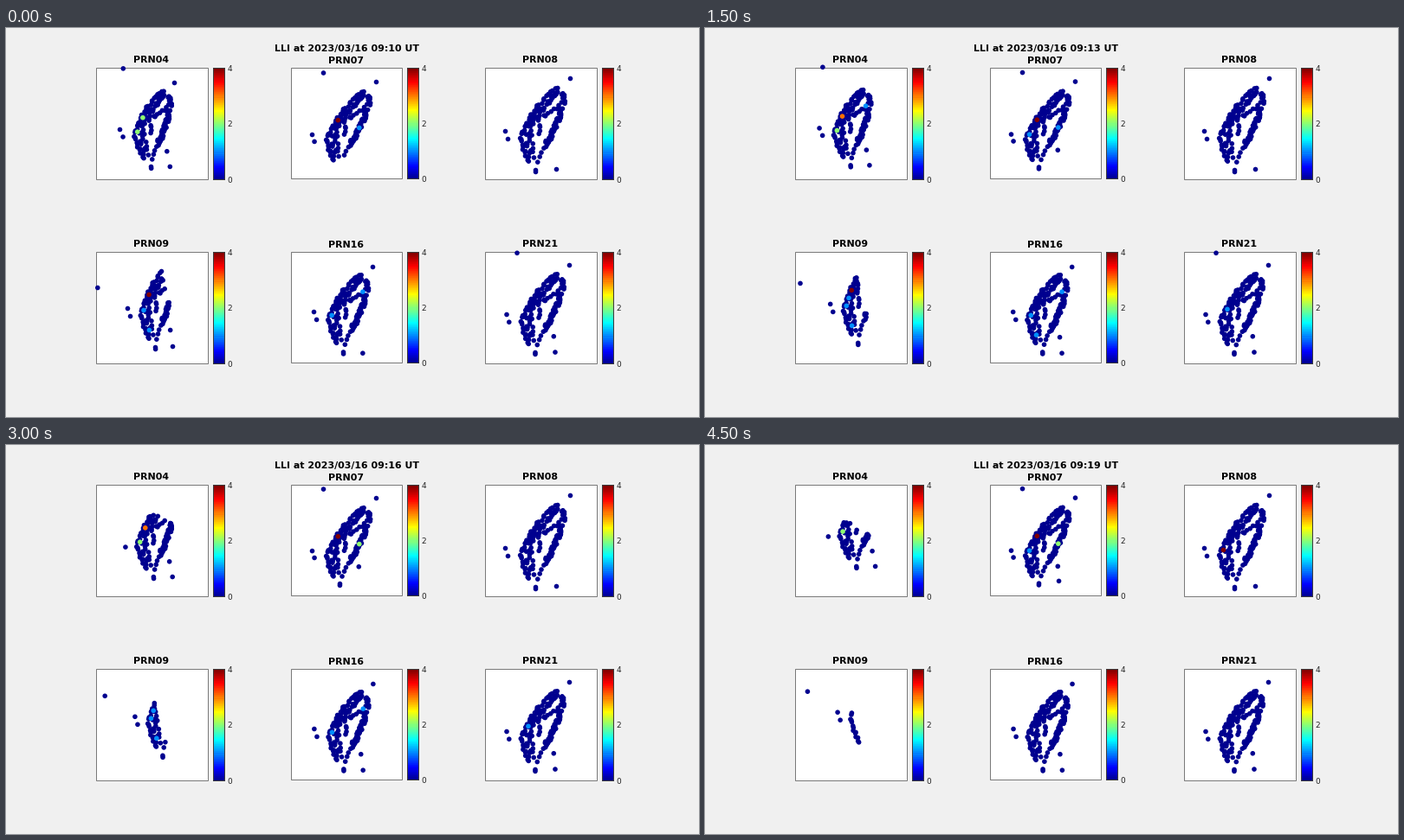
Animation of 800 by 450 pixels, one loop 5000 ms. Source, as a matplotlib script:

```python
import numpy as np
import matplotlib.pyplot as plt
from matplotlib.animation import FuncAnimation
from matplotlib.patches import Rectangle

W, H, DPI = 800, 450, 100
FRAMES, STEP = 10, 500
PX = 72 / DPI
INK = "#262626"
rng = np.random.default_rng(4)


def jet(i):
    """Colour i of a 64-step rainbow."""
    return np.clip(1.5 - np.abs(4 * (np.asarray(i)[..., None] + 1) / 64 - [3, 2, 1]), 0, 1)


def trail(n, jitter, *points):
    """n stations spread along a polyline and scattered around it."""
    p = np.array(points, float)
    d = np.r_[0, np.cumsum(np.hypot(*np.diff(p, axis=0).T))]
    s = np.linspace(0, d[-1], n)
    xy = np.c_[np.interp(s, d, p[:, 0]), np.interp(s, d, p[:, 1])]
    return xy + rng.uniform(-jitter, jitter, xy.shape)


# Station map, in pixels inside a 129 px box
ISLES = {"west": (23, 73), "west2": (26, 82), "north": (98, 12),
         "east": (80, 98), "south": (82, 117), "tip": (58, 118), "tip2": (58, 120)}
HOT = {"A": (53.5, 57), "B": (45, 75), "C": (79.5, 69), "D": (51, 98), "E": (49, 66), "F": (84.5, 43)}
LAND = np.vstack([
    trail(34, 1.5, (82, 23), (70, 31), (61, 44), (50, 58), (40, 82), (44, 97), (51, 108)),
    trail(26, 3.5, (62, 44), (58, 56), (52, 70), (49, 84), (50, 100)),
    trail(9, 1.5, (62, 48), (61, 62), (63, 75)),
    trail(4, 1.5, (56, 86), (55, 102)),
    trail(24, 2.5, (66, 47), (73, 38), (81, 27), (89, 33), (91, 42)),
    trail(8, 2, (66, 56), (75, 49), (88, 45)),
    trail(40, 2.2, (88, 48), (84, 58), (78, 74), (69, 89)),
    trail(4, .7, (67, 92), (63, 100), (60, 108)),
    list(ISLES.values()), list(HOT.values())])
NAMES = [""] * (len(LAND) - len(ISLES) - len(HOT)) + list(ISLES) + list(HOT)


class Panel:
    """One map.

    anchors: where the west, north and tip isles land at the start
    move:    shift of the map at minute t
    cut:     a, b, c, d; a station shows while a*u + b*v > c + d*t
    hide:    isle -> (first, last) minute out of sight
    hot:     station -> mean value, within the minutes of span
    far:     lone station x, y and its last minute
    """

    def __init__(self, name, box, anchors, hot, span=(0, 9), move=lambda t: (0, 0),
                 cut=(0, 0, -1, 0), hide={}, far=None):
        base = [ISLES[k] + (1,) for k in ("west", "north", "tip")]
        self.uv = np.c_[LAND, np.ones(len(LAND))] @ np.linalg.solve(base, np.array(anchors, float))
        self.name, self.box, self.move, self.cut = name, box, move, cut
        self.hide, self.far = hide, far
        self.values = np.zeros((FRAMES, len(LAND)))
        first, last = span
        for key, mean in hot.items():
            noise = rng.uniform(-.45, .45, last - first + 1)
            self.values[first:last + 1, NAMES.index(key)] = np.clip(np.round(mean + noise), 0, 4)

    def dots(self, t):
        a, b, c, d = self.cut
        show = self.uv @ [a, b] > c + d * t
        for key, (first, last) in self.hide.items():
            show[NAMES.index(key)] &= not first <= t <= last
        xy, v = self.uv[show], self.values[t, show]
        if self.far and t <= self.far[2]:
            xy, v = np.vstack([xy, self.far[:2]]), np.r_[v, 0]
        return xy + self.box[:2] + np.array(self.move(t)), v


def ease(t):
    return (t / 9) ** 2.3


panels = [
    Panel("PRN04", (104, 46, 129), [(27, 71), (90, 17), (63, 114)],
          {"A": 2.6, "B": 1.9, "F": .6}, move=lambda t: (7.3 * ease(t), -20 * ease(t)),
          cut=(-.65, 1, -60.3, 9.7), hide={"west": (6, 9)}, far=(30.8, .4, 3)),
    Panel("PRN07", (329, 46, 128), [(24, 76), (98, 15), (56, 114)],
          {"A": 3.5, "B": .7, "C": 1.3}, move=lambda t: (0, 1 - .15 * t),
          cut=(-1, -1, -163, -80), hide={"south": (0, 7)}, far=(37, 4.5, 9)),
    Panel("PRN08", (553, 46, 129), [(23, 73), (98, 12), (58, 118)],
          {"B": 4.5}, span=(7, 9), hide={"east": (0, 9)}),
    Panel("PRN09", (104, 259, 129), [(36, 65), (95, 4), (68, 110)],
          {"A": 3.6, "B": 1.4, "D": 1, "E": .7}, move=lambda t: (1.4 * t, -1.7 * t),
          cut=(-1, .25, -69.5, 3.65), hide={"east": (1, 9), "south": (1, 9)}, far=(1.3, 41, 9)),
    Panel("PRN16", (329, 259, 128), [(26, 69), (94, 17), (60, 115.5)],
          {"B": 1.2, "F": .7, "D": .5}, span=(0, 7),
          move=lambda t: (.06 * t, 0), hide={"east": (0, 0)}),
    Panel("PRN21", (553, 259, 129), [(24.5, 72), (97, 15), (57.5, 116)],
          {"E": 1}, span=(2, 7), far=(36.5, .8, 5)),
]

fig = plt.figure(figsize=(W / DPI, H / DPI), dpi=DPI, facecolor="#f0f0f0")
ax = fig.add_axes([0, 0, 1, 1])
ax.axis("off")


def label(x, y, text, size=11, **kw):
    return ax.text(x, y, text, fontsize=size * PX, family="DejaVu Sans", va="baseline", **kw)


def outline(x, y, w, h, face, edge, z):
    ax.add_patch(Rectangle((x + .5, y + .5), w, h, fc=face, ec=edge, lw=PX, zorder=z, snap=False))


for p in panels:
    x, y, side = p.box
    small = side == 128
    outline(x, y, side, side, "white", "#7a7a7a", 1)
    bx = x + 134 + (not small)
    bar = jet(np.arange(63, -1, -1))[:, None, :]
    ax.imshow(bar, extent=(bx, bx + 14, y + side + 1, y), aspect="auto",
              interpolation="nearest", zorder=2)
    outline(bx, y, 13, side, "none", "#3c3c3c", 3)
    for v in (0, 2, 4):
        label(bx + 16.6, y + side * (1 - v / 4) + 3.6, str(v), 9, color=INK)
    label(x + side / 2 - .6, y - 6 + small, p.name, weight="bold", ha="center")

clock = label(393.4, 27, "", weight="bold", ha="center")
dots = ax.scatter([], [], s=(5.6 * PX) ** 2, linewidths=0, zorder=5)
ax.set_xlim(0, W)
ax.set_ylim(H, 0)


def draw(t):
    parts = [p.dots(t) for p in panels]
    values = np.concatenate([v for _, v in parts])
    order = np.argsort(values, kind="stable")
    dots.set_offsets(np.vstack([xy for xy, _ in parts])[order] + .5)
    dots.set_facecolor(jet(np.minimum(values[order] * 16, 63)))
    clock.set_text(f"LLI at 2023/03/16 09:{10 + t} UT")
    return dots, clock


anim = FuncAnimation(fig, draw, frames=FRAMES, interval=STEP, init_func=lambda: draw(0),
                     repeat=True, repeat_delay=0)
plt.show()
```
